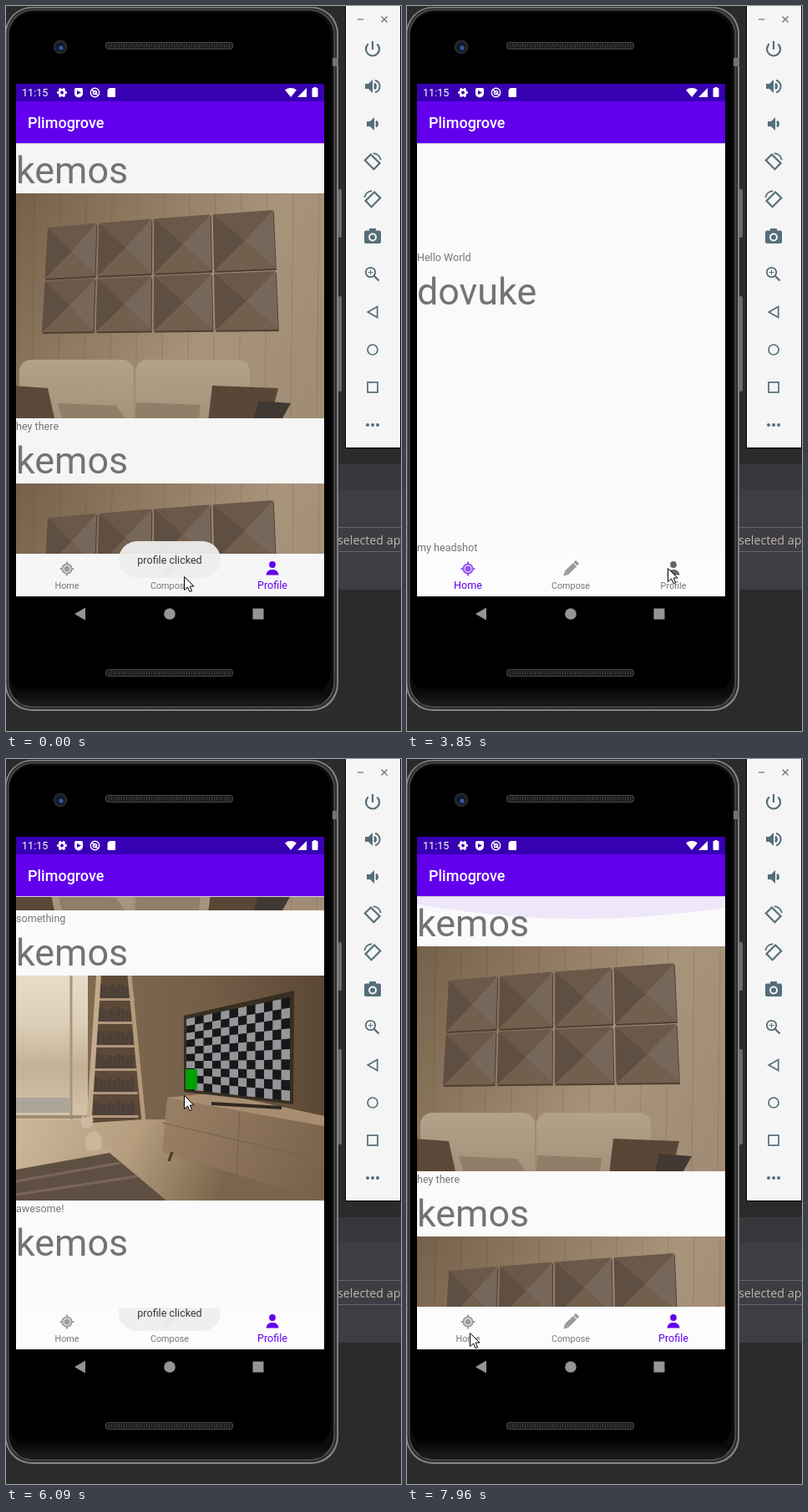
Write an HTML page with a canvas that moves like this. It is 473 by 867 pixels and loops after 8 s.

```html
<!DOCTYPE html>
<html lang="en">
<head>
<meta charset="utf-8">
<title>Phone emulator</title>
<style>
html, body { margin: 0; width: 100%; height: 100%; overflow: hidden; background: #2b2b2b; }
canvas { display: block; }
</style>
</head>
<body>
<canvas id="stage" width="473" height="867"></canvas>
<script>
const g = document.getElementById('stage').getContext('2d');
const LOOP = 8000, TAU = Math.PI * 2;
const PURPLE = '#6200ee', DEEP = '#3700b3', SLATE = '#546e7a', GREY = '#959595';
const LEFT = 12, WIDE = 369, PHOTO = 269, PITCH = 347;   // screen and feed sizes

// ---- helpers ----
const mix = (a, b, t) => a + (b - a) * t;
const ease = t => { t = Math.min(1, Math.max(0, t)); return t * t * (3 - 2 * t); };

function rect(x, y, w, h, c) { g.fillStyle = c; g.fillRect(x, y, w, h); }
function round(x, y, w, h, r, c) { g.beginPath(); g.roundRect(x, y, w, h, r); g.fillStyle = c; g.fill(); }
function disc(x, y, rx, c, ry = rx) { g.beginPath(); g.ellipse(x, y, rx, ry, 0, 0, TAU); g.fillStyle = c; g.fill(); }
function arc(x, y, r, c, w = 1, a = 0, b = TAU) {
  g.beginPath(); g.arc(x, y, r, a, b);
  g.strokeStyle = c; g.lineWidth = w; g.stroke();
}
function poly(p, c) {
  g.beginPath();
  for (let i = 0; i < p.length; i += 2) g.lineTo(p[i], p[i + 1]);
  g.closePath(); g.fillStyle = c; g.fill();
}
function line(x0, y0, x1, y1, c, w = 1) {
  g.beginPath(); g.moveTo(x0, y0); g.lineTo(x1, y1);
  g.strokeStyle = c; g.lineWidth = w; g.stroke();
}
function spokes(x, y, n, r0, r1, c, w) {
  for (let i = 0; i < n; i++) {
    const u = Math.cos(i * TAU / n), v = Math.sin(i * TAU / n);
    line(x + u * r0, y + v * r0, x + u * r1, y + v * r1, c, w);
  }
}
function text(s, x, y, size, c, weight = 400, align = 'left', family = 'Roboto') {
  g.font = `${weight} ${size}px ${family}, sans-serif`;
  g.textAlign = align; g.fillStyle = c; g.fillText(s, x, y);
}
function fade(x0, y0, x1, y1, ...colors) {
  const f = g.createLinearGradient(x0, y0, x1, y1);
  colors.forEach((c, i) => f.addColorStop(i / (colors.length - 1), c));
  return f;
}
function clipped(x, y, w, h, draw) {
  g.save(); g.beginPath(); g.rect(x, y, w, h); g.clip(); draw(); g.restore();
}
function placed(x, y, angle, draw) {
  g.save(); g.translate(x, y); g.rotate(angle); draw(); g.restore();
}

// ---- motion, counted in screen updates ----
const stepAt = t => t < 160 ? 0 : 1 + Math.floor((t - 140) / 134.5);
const tabAt = n => n < 2 ? 2 : n < 11 ? 1 : n < 31 ? 0 : 2;
const homeScroll = n => 1243 * ease((n - 15) / 5);
const mineScroll = n => 659 * (ease((n - 39) / 6) - ease((n - 47) / 11.4));
const bottomGlow = n => Math.max(0, .6 - Math.abs(n - 21) * .23);
const topGlow = n => Math.max(0, (n - 57) / 2);

// Where the hand pauses: step, x, y
const STOPS = [[0, 213, 682], [5, 200, 678], [12, 45, 667], [18, 210, 110], [20, 211, 479],
  [28, 312, 672], [31, 312, 672], [38, 226, 487], [45, 213, 402], [51, 193, 728], [59, 75, 686]];
function cursorAt(n) {
  const i = Math.max(1, STOPS.findIndex(s => s[0] >= n));
  const [t0, x0, y0] = STOPS[i - 1], [t1, x1, y1] = STOPS[i];
  const t = ease((n - t0) / (t1 - t0));
  return [Math.round(mix(x0, x1, t)), Math.round(mix(y0, y1, t))];
}

// ---- pictures: 369 x 269, origin at their top left corner ----
function sofaPicture() {
  rect(0, 0, WIDE, PHOTO, fade(0, 0, WIDE, 200, '#75604a', '#8f7960', '#a8947b', '#a18d75'));
  for (let x = 22; x < WIDE; x += 31) line(x, 0, x - 3, PHOTO, 'rgba(70,50,32,.18)');

  const corner = (c, r, dx, dy) => [
    36 + 59 * c + 2.3 * c * c + r / 2 * (3.25 * c - 7) + dx,
    39 - 5.25 * c + r / 2 * (128 + 4.5 * c) + dy];
  for (let r = 0; r < 2; r++) for (let c = 0; c < 4; c++) {
    const q = [corner(c, r, 2, 2), corner(c + 1, r, -1, 2), corner(c + 1, r + 1, -1, -1), corner(c, r + 1, 2, -1)];
    const mid = [0, 1].map(k => q.reduce((s, p) => s + p[k] / 4, 0));
    poly(q.flatMap(p => [p[0] + 1, p[1] + 2]), '#4d3f32');
    ['#6a5949', '#77675a', '#725f4e', '#5f4f42'].forEach((c, i) => poly([...q[i], ...q[(i + 1) % 4], ...mid], c));
  }

  for (const x of [4, 143]) round(x, 199, 137, 90, 14, fade(0, 199, 0, PHOTO, '#b3a18a', '#a5927b'));
  const pillow = (x, y, w, lean, c) => poly([x, y, x + w, y + 3, x + w - lean, PHOTO, x - lean / 2, PHOTO], c);
  pillow(-4, 230, 42, -8, '#5b4838');
  pillow(50, 251, 70, -10, '#917e69');
  pillow(144, 250, 77, 2, '#917e69');
  pillow(235, 230, 79, 9, '#5a4636');
  pillow(290, 248, 39, 10, '#403833');
}

function tvPicture() {
  rect(0, 0, WIDE, PHOTO, fade(90, 0, WIDE, 0, '#806a52', '#755e48', '#5b4735'));
  rect(0, 172, WIDE, 97, fade(20, 172, 240, 269, '#c9b496', '#b59d7e', '#7d654c'));
  // window
  rect(0, 0, 86, 172, fade(0, 0, 0, 165, '#e8dcc8', '#ddcfb8', '#c3b196', '#d3c2a8'));
  rect(0, 146, 64, 18, '#aca59a');
  line(66, 0, 66, 172, '#a8947a', 3);
  line(0, 169, 90, 169, '#a08b6f', 4);
  // rug
  poly([0, 232, 112, 212, 180, PHOTO, 0, PHOTO], '#5f4f42');
  line(0, 246, 125, 224, '#78665a', 3);
  line(0, 262, 145, 240, '#78665a', 3);
  // ladder shelf
  poly([97, 0, 138, 0, 152, 172, 90, 176], '#5c4836');
  for (let i = 0; i < 6; i++) {
    const y = 27 + i * 28, x = 98 - i * 1.5, w = 44 + i * 2.4;
    for (let b = 0; b < 9; b++) rect(x + 2 + b * w / 10, y - 17 + b * 2 % 5, w / 10 - 1, 17 - b * 2 % 5, '#4a4039');
    rect(x, y, w, 3, '#b0967a');
  }
  line(99, 0, 87, 181, '#c2aa8c', 6);
  line(136, 0, 153, 175, '#b39a7c', 5);
  // cabinet
  poly([181, 146, 240, 140, WIDE, 168, WIDE, PHOTO, 175, 211], fade(175, 150, WIDE, 240, '#9a8166', '#7a624a'));
  poly([181, 146, 240, 140, WIDE, 168, WIDE, 180], '#a88e71');
  line(175, 176, WIDE, 221, '#77604a');
  line(268, 163, 264, 237, '#77604a');
  line(187, 211, 183, 222, '#4c3827', 3);
  // television
  line(234, 153, 318, 158, '#30281f', 4);
  poly([201, 48, 333, 18, 332, 154, 201, 139], '#372f21');
  const cols = 12, rows = 10;
  const at = (i, j) => {
    const u = i / cols, v = j / rows;
    return [204 + 124 * u, mix(52 - 26 * u, 136 + 14 * u, v)];
  };
  for (let i = 0; i < cols; i++) for (let j = 0; j < rows; j++)
    poly([...at(i, j), ...at(i + 1, j), ...at(i + 1, j + 1), ...at(i, j + 1)], (i + j) % 2 ? '#18181a' : '#94969a');
  rect(203, 112, 14, 24, '#00a000');
  // cat
  disc(93, 200, 10, '#c9b69c', 14);
  disc(85, 176, 7, '#cbb9a0');
  for (const x of [80, 90]) poly([x - 3, 174, x, 166, x + 3, 174], '#cbb9a0');
  line(84, 212, 114, 209, '#bda88c', 4);
}

// ---- feed ----
const MINE = 'kemos';
const POSTS = [
  [MINE, 'hey there', sofaPicture],
  [MINE, 'something', sofaPicture],
  [MINE, 'awesome!', tvPicture],
  [MINE, 'Hello World'],
  ['dovuke', 'my headshot']
];
function feed(posts, scroll) {
  posts.forEach(([name, caption, picture], i) => {
    const y = Math.round(224 + i * PITCH - scroll);
    text(name, LEFT, y - 12, 44.9, '#737373');
    text(caption, LEFT, y + 283, 12.57, '#757575');
    if (picture) clipped(LEFT, y, WIDE, PHOTO, () => { g.translate(LEFT, y); picture(); });
  });
}
function glow(edge, dir, size) {
  const ry = 1128 * size;
  disc(208, edge + dir * (27 * size - ry), 1128, 'rgba(98,0,238,.08)', ry);
}
function content(n) {
  rect(LEFT, 164, WIDE, 491, n ? '#fafafa' : '#f5f5f5');
  if (n < 16) rect(LEFT, 164, WIDE, 14, '#f5f5f5');
  clipped(LEFT, 164, WIDE, 491, () => {
    if (n < 2 || n > 32) feed(POSTS.slice(0, 4), mineScroll(n));
    else if (n > 12 && n < 31) feed(POSTS, homeScroll(n));
    glow(655, -1, bottomGlow(n));
    glow(164, 1, topGlow(n));
  });
}

// ---- tabs, ripple, toast ----
function homeIcon(x, y, c) {
  arc(x, y, 5.6, c, 2);
  disc(x, y, 3.6, c);
  spokes(x, y, 4, 5, 8.4, c, 2);
}
function composeIcon(x, y, c) {
  placed(x, y, TAU / 8, () => {
    rect(-3, -7, 6, 14, c);
    round(-3, -11.5, 6, 3.5, 1, c);
    poly([-3, 7, 3, 7, 0, 12], c);
  });
}
function profileIcon(x, y, c) {
  disc(x, y - 5, 3.9, c);
  round(x - 7.5, y + 1, 15, 6.5, [7, 7, 0, 0], c);
}
const TABS = [['Home', homeIcon, '#9b9b9b', '#9355f2'], ['Compose', composeIcon, '#9b9b9b', PURPLE], ['Profile', profileIcon, '#666', PURPLE]];
function tabs(n) {
  rect(LEFT, 655, WIDE, 51, n ? '#fcfcfc' : '#f6f6f6');
  TABS.forEach(([label, icon, off, on], i) => {
    const x = 73 + i * 123, active = tabAt(n) === i;
    icon(x, 673, active ? on : off);
    text(label, x, 696.5, active ? 12.57 : 10.8, active ? PURPLE : '#757575', 400, 'center');
  });
}
function ripple(n) {
  [2, 11, 31].forEach(start => {
    const age = n - start;
    if (age < 0 || age > 1) return;
    clipped(LEFT, 164, WIDE, 542, () => disc(73 + tabAt(n) * 123, 681, 40 + 27 * age, 'rgba(0,0,0,.065)'));
  });
}
function toast(n) {
  const mine = n < 2 || n > 30, label = (mine ? 'profile' : 'compose') + ' clicked';
  if (n > 46 || n > 20 && n < 31) return;
  const w = mine ? 122 : 139, top = n > 44 ? 656 : 640;
  clipped(LEFT, top, WIDE, 684 - top, () => {
    g.globalAlpha = n === 20 ? .42 : .94;
    round(196 - w / 2, 640, w, 44, 22, '#eee');
    text(label, 196, 667, 12.57, '#2b2b2b', 400, 'center');
  });
}

// ---- fixed surroundings ----
function desktop() {
  rect(0, 0, 473, 867, '#2b2b2b');
  rect(380, 548, 93, 30, '#37383b');
  rect(380, 578, 93, 120, '#3d3e43');
  for (const y of [623, 652]) rect(380, y, 93, 1, '#6a6763');
  text('selected ap', 397, 644, 14.3, '#c0b6a8', 400, 'left', "'Open Sans'");
}
function grille(y) {
  round(119, y, 153, 9, 4, '#464646');
  round(120, y + 1, 151, 7, 3, '#1d1d1d');
  for (let x = 123; x < 268; x += 3) rect(x, y + 2 + x % 2, 1, 4, '#3c3c3c');
}
function phone() {
  for (const [y, h] of [[219, 58], [347, 114]]) round(394, y, 8, h, 2, '#6a6a6a');
  const shells = ['#858585', '#2a2a2a', '#4a4a4a', '#0c0c0c'];
  shells.forEach((c, i) => round(i * 1.5 - 1, 1 + i * 1.5, 399 - i * 3.4, 842 - i * 3.4, 32 - i, c));
  round(4, 8, 385, 816, 28, '#000');
  round(12, 812, 372, 24, 16, fade(0, 812, 0, 836, '#000', '#1c1c1c'));
  rect(391, 62, 7, 10, '#737373');
  disc(65, 49, 8.5, '#25262b');
  disc(65, 49, 5.5, '#11182e');
  disc(66, 50, 2.6, '#3c579f');
  grille(43);
  grille(793);
}
function statusIcons() {
  const y = 103.5;
  spokes(67, y, 6, 0, 5.8, '#fff', 2.8);
  disc(67, y, 4.5, '#fff');
  disc(67, y, 1.9, DEEP);
  round(82, 98, 10, 11.5, [2, 2, 6, 6], '#fff');
  poly([85, 101, 90, y, 85, 106], DEEP);
  arc(106.5, y, 5.2, '#fff', 1.4);
  arc(106.5, y, 2.2, '#fff', 1.3);
  line(103, 100, 110, 107, '#fff', 1.3);
  round(121.5, 98, 9.5, 11, [4, 1, 1, 1], '#fff');
  g.beginPath(); g.moveTo(341, 109); g.arc(341, 109, 11, -2.25, -.89); g.fillStyle = '#fff'; g.fill();
  poly([360, 98, 360, 109, 349, 109], '#fff');
  round(366.5, 98, 7, 11, 1, '#fff');
  rect(368.5, 97, 3, 2, '#fff');
}
function bars() {
  rect(LEFT, 93, WIDE, 21, DEEP);
  rect(LEFT, 114, WIDE, 50, PURPLE);
  rect(LEFT, 164, WIDE, 1, '#d5d0dd');
  text('11:15', 19, 108, 12.6, '#fff');
  text('Plimogrove', 26, 146, 18, '#fff', 500);
  statusIcons();
  poly([82, 727, 95, 719.5, 95, 734.5], GREY);
  disc(196, 727, 6.8, GREY);
  rect(295.5, 720.5, 13, 13, GREY);
}

// Emulator buttons, each drawn around its own centre
function speaker(waves) {
  rect(-9, -3, 5, 6, SLATE);
  poly([-6, -2, 0, -8, 0, 8, -6, 2], SLATE);
  arc(0, 0, 3.5, SLATE, 3, -1, 1);
  if (waves) arc(1, 0, 7.6, SLATE, 2, -1.3, 1.3);
}
function turn(side) {
  g.scale(side, 1);
  arc(0, 0, 10, SLATE, 1.8, -1.5, -.2);
  g.rotate(TAU / 8);
  g.lineWidth = 2.2; g.strokeRect(-7.5, -4.5, 15, 10);
}
const BUTTONS = [
  () => { arc(0, .5, 8, SLATE, 2.2, -.85, 4); line(0, -9, 0, 1, SLATE, 2.2); },
  () => speaker(true),
  () => { g.translate(2, 0); speaker(false); },
  () => turn(1),
  () => turn(-1),
  () => { round(-10, -7.5, 20, 15.5, 2, SLATE); rect(-4, -10, 8, 4, SLATE); arc(0, .5, 4, '#f5f5f5', 2); },
  () => {
    arc(-2.5, -2.5, 5.7, SLATE, 1.8);
    line(1.5, 1.5, 7.5, 7.5, SLATE, 2.4);
    spokes(-2.5, -2.5, 4, 0, 3, SLATE, 1);
  },
  () => { poly([-7.5, 0, 6.5, -8, 6.5, 8], SLATE); poly([-4, 0, 4.8, -5, 4.8, 5], '#f5f5f5'); },
  () => arc(0, 0, 6, SLATE, 1.7),
  () => { g.lineWidth = 1.7; g.strokeRect(-6, -6, 12, 12); },
  () => { for (const x of [-6, 0, 6]) disc(x, 0, 2, SLATE); }
];
function toolPanel() {
  rect(406, 0, 67, 529, '#000');
  rect(407, 0, 65, 528, '#f5f5f5');
  line(421, 16, 428, 16, '#777', 1.3);
  placed(453, 16, TAU / 8, () => spokes(0, 0, 4, 0, 5, '#777', 1.3));
  BUTTONS.forEach((draw, i) => placed(439, 51 + i * 45, 0, () => { g.strokeStyle = SLATE; draw(); }));
}
function pointer(n) {
  const [x, y] = cursorAt(n);
  placed(x + .5, y + .5, 0, () => {
    poly([0, 0, 0, 16, 4, 12.5, 6.5, 18, 9, 17, 6.7, 11.5, 11.5, 11.5], '#fff');
    g.strokeStyle = '#000'; g.lineWidth = 1; g.stroke();
  });
}

function render(n) {
  [desktop, phone, content, bars, tabs, ripple, toast, toolPanel, pointer].forEach(draw => draw(n));
}

let shown = -1;
function tick(now) {
  const n = stepAt(now % LOOP);
  if (n !== shown) render(shown = n);
  requestAnimationFrame(tick);
}
requestAnimationFrame(tick);
</script>
</body>
</html>
```
